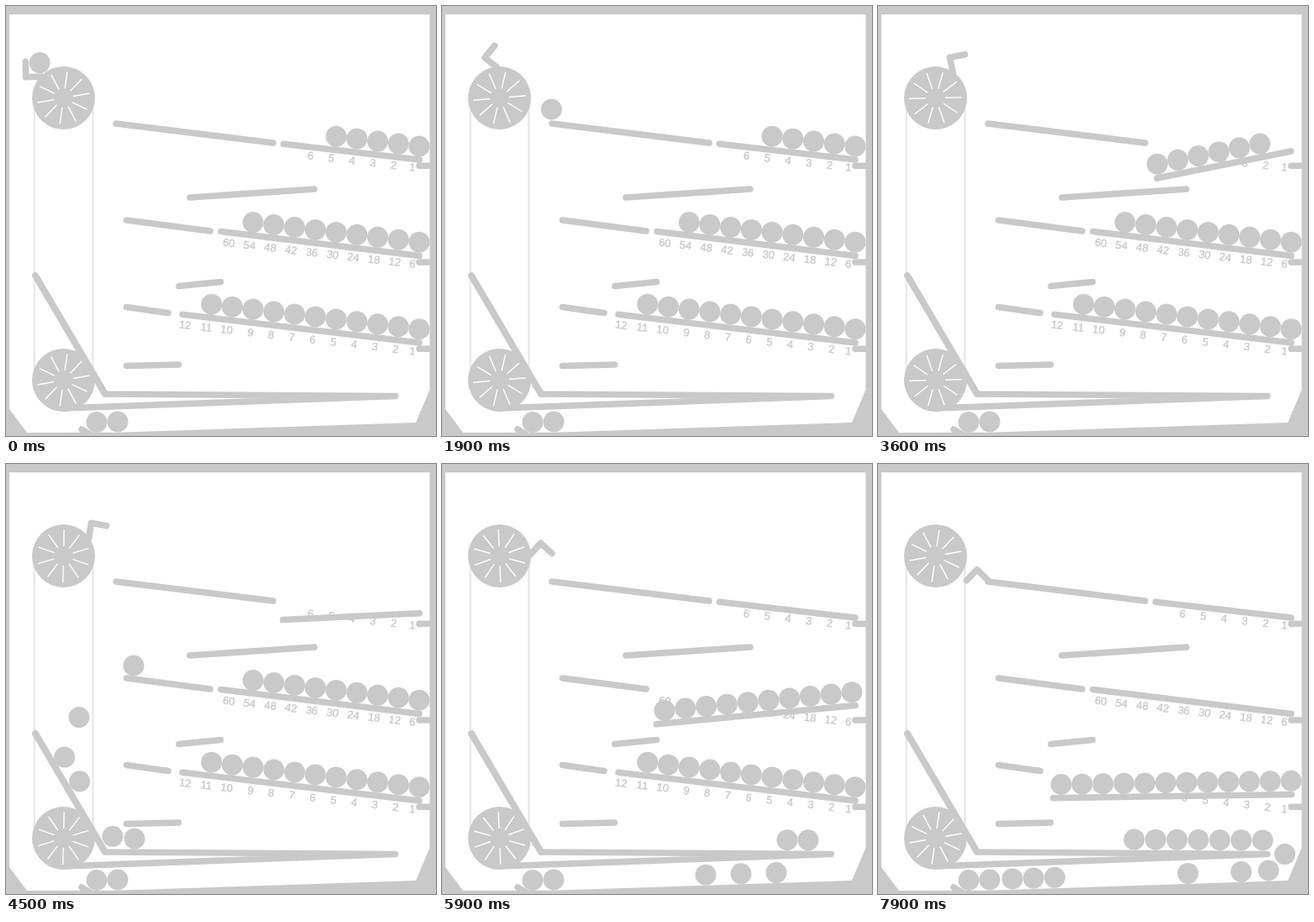
An HTML page that plays this animation: 512x512 px, repeating every 8000 ms.

```html
<!DOCTYPE html>
<html lang="en">
<head>
<meta charset="utf-8">
<title>Rolling ball clock</title>
<style>
  html, body { margin: 0; width: 100%; height: 100%; overflow: hidden; background: #c9c9c9; }
  svg { display: block; width: 100vw; height: 100vh; }
  .bar { fill: none; stroke: #c9c9c9; stroke-width: 7.6; stroke-linecap: round; stroke-linejoin: round; }
  .chain { stroke: #e9e9e9; stroke-width: 2.4; }
  .spoke { stroke: #fff; stroke-width: 1.4; }
  .solid { fill: #c9c9c9; }
  text { fill: #c9c9c9; stroke: #c9c9c9; stroke-width: .4; text-anchor: end;
    font: 13px "Liberation Sans", Arial, sans-serif; }
</style>
</head>
<body>
<svg id="stage" viewBox="0 0 512 512">
  <rect class="solid" width="512" height="512"/>
  <path fill="#fff" d="M4 10H504.500V457L488 496L133 507.700L25 508L4 480Z"/>
  <path class="chain" d="M33.800 110V445M103.500 110V445"/>
  <path class="bar" d="M131 140L318 163M219 228L367 218M143.500 255L243 268M206 333.500L255.500 328.500
    M143.500 358.500L193 365.500M143.500 428.500L205.500 427M35 321L118 462L463.500 464.500L68 479M90 504L100 510
    M492 190.300H510M492 305H510M492 408.300H510"/>
</svg>
<script>
const stage = document.getElementById('stage');
const add = (tag, attrs, parent = stage) => {
  const el = document.createElementNS('http://www.w3.org/2000/svg', tag);
  for (const name in attrs) el.setAttribute(name, attrs[name]);
  return parent.appendChild(el);
};
const RAD = Math.PI / 180;
const LOOP = 80, STEP = 100;                 // ticks per loop, ms per tick
const RADIUS = 12.5, GAP = 24.9, SLOPE = 6.81 * RAD;
const TIPPED = 18, PULL = 16;                // tray swing in degrees, its acceleration
const ROLL_DELAY = 0.68, ROLL = 430;         // seconds until a tipping row rolls, cubic rate
const HUB = { x: 68.5, y: 109.5 };

const sq = n => n * n;
const mix = (a, b, f) => a + (b - a) * f;
const mixPoint = (a, b, f) => a.map((n, k) => mix(n, b[k], f));

// Position on a route of [progress, x, y] points
function along(route, s) {
  const j = Math.min(Math.max(route.findIndex(p => p[0] > s), 1), route.length - 1);
  const a = route[j - 1], b = route[j];
  const f = Math.min(1, Math.max(0, (s - a[0]) / (b[0] - a[0])));
  return mixPoint(a.slice(1), b.slice(1), f);
}

// Shared way back: chute, lower rail, drop and floor
const wayBack = [
  [57, 89, 380], [125, 125, 442], [131, 131, 446], [463, 463, 448],
  [484, 485, 465], [509, 465, 484], [561, 439, 485.3], [892, 108, 495.5]
];

// meet: the row of balls is strung out in pairs; reach: it is evenly spaced again
const minutes = {
  end: [330.5, 164.3], tip: [492, 183], pivot: [460, 179.2], slot0: [492, 167],
  count: 6, unit: 1, label: [365.8, 183], fall: 2.48, lift: 22.7, lead: 38,
  route: [[-341, 331, 188], [-318, 313, 205], [-220, 217, 212], [-190, 203, 245], [-131, 152, 240],
    [-80, 110, 262], [-47, 88, 299], [28, 69, 348], ...wayBack],
  meet: { t: 4.5, s: 153, pitch: 98 }, reach: { t: 5.9, s: 686, gap: 42 },
  through: 3, hand: { t: 4.5, s: -131 }
};
const fives = {
  end: [256, 268.5], tip: [492, 297.5], pivot: [446, 291.8], slot0: [492, 281.2],
  count: 10, unit: 6, label: [272, 287.3], fall: 5.02, lift: 41.5, lead: 17,
  route: [[-141, 254, 311], [-85, 203, 317], [-50, 180, 346.5], [-13, 143, 341.5],
    [30, 132, 346], ...wayBack],
  meet: { t: 7.1, s: 274, pitch: 61 }, reach: { t: 7.9, s: 509, gap: 25.5 },
  through: 9, hand: { t: 6.97, s: -31 }
};
const hours = {
  end: [210, 367.2], tip: [492, 401], pivot: [436, 394.2], slot0: [492, 384.7],
  count: 12, unit: 1, label: [220, 385], fall: 7.206
};
const trays = [minutes, fives, hours];
minutes.next = fives;
fives.next = hours;

function exitTime(tray, slot) {
  if (!tray.route) return Infinity;
  const way = tray.lead + GAP * (tray.count - 1 - slot);
  return tray.fall + ROLL_DELAY + Math.cbrt(way / ROLL);
}

function tilt(tray, t) {
  const back = exitTime(tray, 0);
  if (t > back) return Math.max(0, TIPPED - tray.lift * sq(t - back));
  return Math.min(TIPPED, PULL * sq(Math.max(0, t - tray.fall)));
}

function onTray(tray, slot, t) {
  const a = -tilt(tray, t) * RAD, [px, py] = tray.pivot;
  const rolled = ROLL * Math.max(0, t - tray.fall - ROLL_DELAY) ** 3;
  const d = slot * GAP + rolled + 13 * Math.sin(a);   // the row leans on the wall as it lifts
  const x = tray.slot0[0] - d * Math.cos(SLOPE) - px;
  const y = tray.slot0[1] - d * Math.sin(SLOPE) - py;
  return [px + x * Math.cos(a) - y * Math.sin(a), py + x * Math.sin(a) + y * Math.cos(a)];
}

// Progress of the i-th ball to leave a tray
function progress(tray, i, t, exit) {
  const { meet, reach, hand } = tray, start = tray.route[0][0];
  if (i === tray.count - 1) return mix(start, hand.s, (t - exit) / (hand.t - exit));

  const met = meet.s - meet.pitch * (i >> 1) - 26 * (i & 1);
  if (t < meet.t) return mix(start, met, (t - exit) / (meet.t - exit));

  const j = i - tray.through;
  if (j < 0) {
    const s = mix(met, reach.s - reach.gap * i, (t - meet.t) / (reach.t - meet.t));
    return Math.min(s, 840 - 25.2 * i);
  }
  // Too slow to leave the rail: creep until the next row pushes
  const stall = mix(met, 436 - 25 * j, Math.min(1, (t - meet.t) / 1.1));
  return stall + 10 * Math.max(0, t - reach.t) + 350 * Math.max(0, t - 7.4 - 0.11 * j);
}

// A ball's whole way: tray, route, and for the last one the next tray
function ride(tray, slot, t) {
  const exit = exitTime(tray, slot);
  if (t < exit) return onTray(tray, slot, t);

  const { route, next, hand } = tray;
  if (slot === 0 && t >= hand.t) {
    const top = next.count - 1;
    if (t >= next.fall) return ride(next, top, t);
    return mixPoint(along(route, hand.s), onTray(next, top, 0), sq((t - hand.t) / (next.fall - hand.t)));
  }
  const edge = onTray(tray, slot, exit), left = Math.max(0, 1 - (t - exit) / 0.1);
  return along(route, progress(tray, tray.count - 1 - slot, t, exit))
    .map((n, k) => n + (edge[k] - route[0][k + 1]) * left);
}

const spin = t => t < 1.9 ? 21.6 * t : 41.04 + 23.15 * (t - 1.9);
const armAngle = t => 43.6 + spin(t);

// The ball carried up by the arm, over the wheel and down the top rail
function lifted(t) {
  const push = 1.5, land = 1.9;
  if (t >= minutes.fall) return ride(minutes, minutes.count - 1, t);
  if (t >= land) {
    const f = (t - land) / (minutes.fall - land);
    return mixPoint([130.3, 123], onTray(minutes, minutes.count - 1, 0), mix(f, f * f, 0.45));
  }
  const over = 45.7 * sq(Math.max(0, t - push) / 0.3);
  const a = (armAngle(Math.min(t, push)) + 12.3 + over) * RAD;
  return [HUB.x - 50.6 * Math.cos(a), HUB.y - 50.6 * Math.sin(a)];
}

const paths = [lifted, () => [108, 495.5], () => [133, 495]];
for (const tray of trays)
  for (let slot = 0; slot < tray.count - 1; slot++) paths.push(t => ride(tray, slot, t));

for (const tray of trays) {
  const [x, y] = tray.label;
  for (let i = 0; i < tray.count; i++) {
    const left = tray.count - i;
    const px = left === 1 ? 487 : x + 24.7 * i, py = y + (px - x) * 0.1146;
    add('text', { transform: `translate(${px} ${py}) rotate(6.8)` }).textContent = left * tray.unit;
  }
  tray.el = add('path', { class: 'bar', d: `M${tray.end}L${tray.tip}` });
}

const arm = add('path', { class: 'bar', d: 'M-37 0L-49.5 13L-62.5 0' });

const wheels = [HUB.y, 445.5].map(y => {
  const g = add('g', {});
  add('circle', { class: 'solid', r: 37.5 }, g);
  for (let i = 0; i < 10; i++)
    add('path', { class: 'spoke', d: 'M0 -11.5V-31.5', transform: `rotate(${8 + 36 * i})` }, g);
  return { g, y };
});
add('path', { class: 'bar', d: 'M35 321L118 462' });

const balls = paths.map(path => ({ path, el: add('circle', { class: 'solid', r: RADIUS }) }));

function draw(t) {
  const angle = armAngle(t);
  const down = Math.max(0, angle - 180) * 0.67;
  arm.setAttribute('transform', `translate(${HUB.x} ${HUB.y + down}) rotate(${Math.min(angle, 180)})`);
  for (const { g, y } of wheels) g.setAttribute('transform', `translate(${HUB.x} ${y}) rotate(${spin(t)})`);
  for (const tray of trays) tray.el.setAttribute('transform', `rotate(${-tilt(tray, t)} ${tray.pivot})`);
  for (const { path, el } of balls) {
    const [x, y] = path(t);
    el.setAttribute('cx', x);
    el.setAttribute('cy', y);
  }
}

const begin = performance.now();
function tick() {
  draw(Math.floor((performance.now() - begin) / STEP) % LOOP * STEP / 1000);
  requestAnimationFrame(tick);
}
tick();
</script>
</body>
</html>
```
